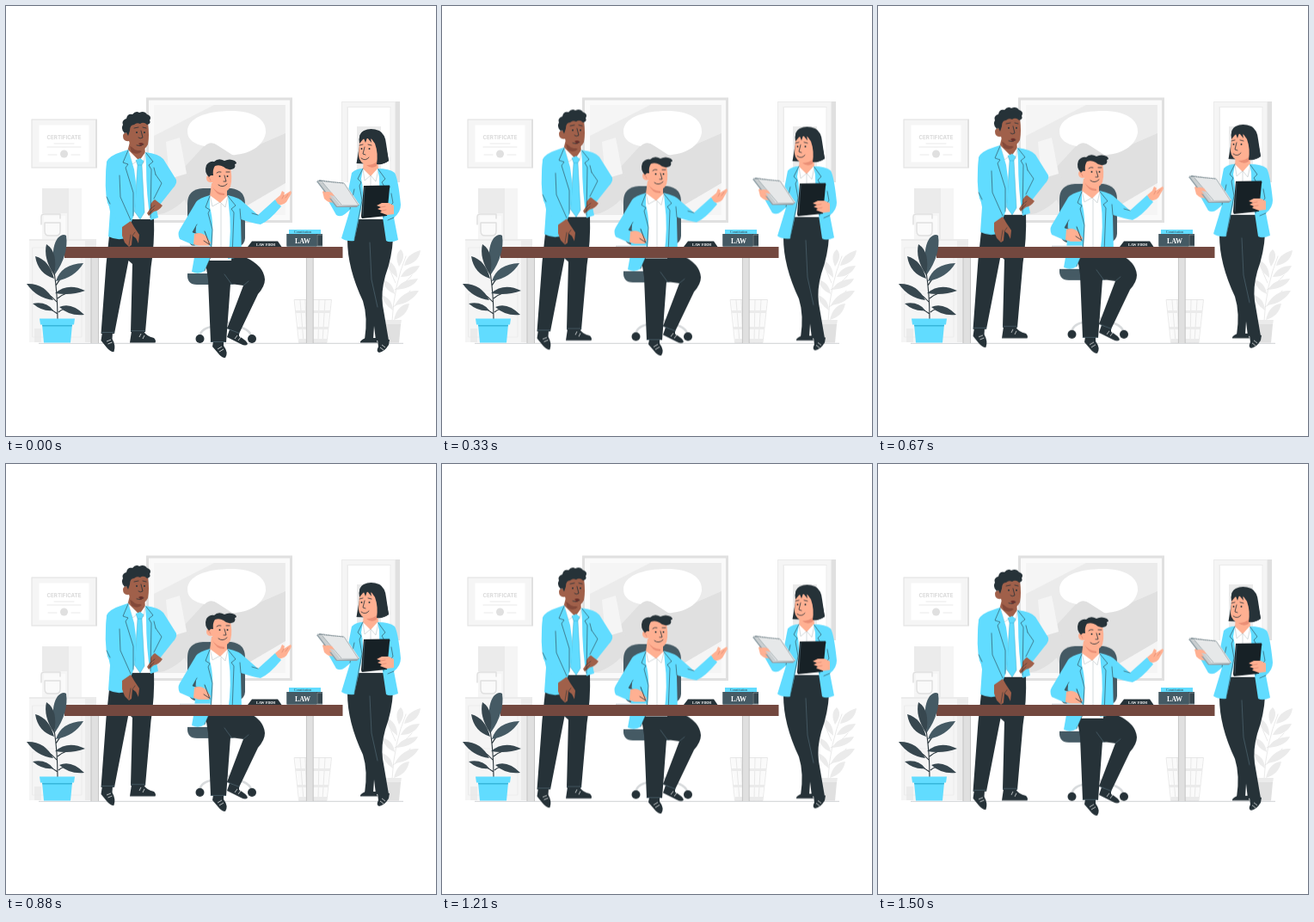
These frames come from a looping animation (500x500 px, 1.54 s). An HTML page:

```html
<!DOCTYPE html>
<html lang="en">
<head>
<meta charset="utf-8">
<title>Law office</title>
<style>
  html, body { margin: 0; width: 100%; height: 100%; overflow: hidden; background: #fff; }
  svg { display: block; width: 100vw; height: 100vh; }
  .people { animation: float 1540ms linear infinite; }
  @keyframes float { 50% { transform: translateY(-6px); } }

  .dark { fill: #263238; }
  .deep { fill: #37474f; }
  .slate { fill: #455a64; }
  .blue { fill: #61dcff; }
  .white { fill: #fff; }
  .g1 { fill: #fafafa; }
  .g2 { fill: #f5f5f5; }
  .g3 { fill: #ebebeb; }
  .g4 { fill: #e0e0e0; }
  .tan { fill: #ffb092; }
  .brown { fill: #a0604a; }
  .ink, .pale, .seam, .fold { fill: none; stroke-linecap: round; stroke-linejoin: round; }
  .ink { stroke: #263238; stroke-width: .55; }
  .face { stroke-width: .8; }
  .pale { stroke: #e0e0e0; stroke-width: .7; }
  .seam { stroke: #607d8b; stroke-width: .5; }
  .fold { stroke: #a9b4b9; stroke-width: .5; }
  .lace { fill: none; stroke: #fff; stroke-width: .7; }
  .blush { stroke: #d37b66; }
  text { text-anchor: middle; }
  .sans { font-family: Inter, "Open Sans", sans-serif; font-weight: 700; }
  .serif { font-family: "Liberation Serif", "Noto Serif", serif; font-weight: 700; }
</style>
</head>
<body>
<svg viewBox="0 0 500 500">

  <!-- wall -->
  <g id="certificate">
    <path class="g4" d="M29.500 131.500H106V188.500H29.500Z"/>
    <path class="g2" d="M30.500 132.500H104V187.500H30.500Z"/>
    <path class="white" d="M38.500 138.500H96.500V181.500H38.500Z"/>
    <text class="sans" x="67.500" y="155" font-size="6.200" fill="#d9d9d9">CERTIFICATE</text>
    <path class="pale" d="M56 160H79M48 164H87M49 173H59M76 173H86"/>
    <circle class="g4" cx="67.500" cy="172" r="4.500"/>
  </g>

  <g id="painting">
    <path class="g4" d="M163 106.500H333V252H163Z"/>
    <path class="g1" d="M166 109.500H330V249H166Z"/>
    <path class="g3" d="M172 115H325V243H172Z"/>
    <path class="g2" d="M172 115H242L172 151Z"/>
    <path class="g4" d="M230 163Q237 155 246 162L265 174L325 148V206L262 243H216L196 200Z"/>
    <path class="g2" d="M325 206V243H262Z"/>
    <path class="g4" d="M172 198Q205 190 220 203Q214 228 184 241L172 243Z"/>
    <path class="g2" d="M186 158L202 153L210 195L190 201Z"/>
    <path class="white" d="M211 146C211 130 233 122 262 122C288 122 303 132 302 147C300 163 282 173 263 173L246 162Q238 156 231 163C219 161 211 155 211 146Z"/>
  </g>

  <g id="window">
    <path class="g3" d="M390 111H453V205H390Z"/>
    <path class="g4" d="M453 111H458V205H453Z"/>
    <path class="g2" d="M391 112H452V205H391Z"/>
    <path class="g3" d="M396.500 117H447.500V205H396.500Z"/>
    <path class="white" d="M398 118H446.500V205H398Z"/>
    <path class="g3" d="M408 140H436V205H408Z"/>
  </g>

  <!-- cabinet and coffee machine -->
  <path class="g2" d="M42 212H88V272H42Z"/>
  <path class="g3" d="M42 212H71V241H42ZM71 212H73V272H71Z"/>
  <path class="g1" d="M44 244H69V266H44Z"/>
  <path class="pale" d="M41 254V245Q41 242 45 242H63V247M45 252H63V262Q63 267 58 267H50Q45 267 45 262Z" style="stroke-width:1.500"/>
  <path class="g2" d="M27 271H105V391H27Z"/>
  <path class="g3" d="M27 271H105V273H27ZM92 273H105V391H92ZM33 375H41V391H33Z"/>
  <path class="pale" d="M31 281H88V331H31ZM31 335H88V385H31Z" style="stroke:#e9e9e9"/>

  <!-- pale plant -->
  <g id="palePlant">
    <path class="pale" d="M449 366Q451 325 465 291M450 350Q460 345 470 331M452 330Q462 325 472 313M453 322Q448 311 446 305"/>
    <path class="g3" d="M457 303Q451 289 459 283Q466 290 457 303ZM463 302Q466 288 482 284Q480 299 463 302ZM455 316Q443 307 442 295Q455 300 455 316ZM459 315Q465 302 481 302Q475 315 459 315ZM454 330Q459 318 479 317Q474 328 454 330ZM452 335Q441 331 437 318Q450 321 452 335ZM452 348Q462 330 480 331Q471 346 452 348ZM450 354Q439 347 437 336Q449 340 450 354ZM451 365Q455 347 469 346Q466 361 451 365Z"/>
    <path class="g4" d="M436 365H459.500L457 391.500H439Z"/>
    <path class="g3" d="M436 365H459.500L459 370H436.500Z"/>
  </g>

  <!-- bin and desk legs -->
  <path class="g1" d="M336 341H378L372 391H342Z"/>
  <path class="pale" d="M335.500 341.500H378.500L373 391.500H341ZM342 342L346 391M364 342L363 391M371 342L368 391M348 342L350 391"/>
  <path class="g3" d="M337 354H377V357H337ZM339 373H375V376H339ZM341 387H373V391H341Z"/>
  <path d="M38 392.300H462" stroke="#b9bec0" stroke-width=".7"/>
  <path class="g4" d="M98.500 293H108V392H98.500ZM349 293H357.500V392H349Z"/>
  <path d="M99 293V392M107.500 293V392M349.400 293V392M357.200 293V392" stroke="#b4b4b4" stroke-width=".6"/>

  <g class="people">

    <!-- standing man -->
    <g id="advisor">
      <path class="dark" d="M121 258Q145 243 172 246Q173 276 168.500 304L162 379H145L147 300L142.500 296L126 381H110.500L116.500 300Z"/>
      <path class="dark" d="M112 379L124 380L123.500 387Q128 395 125.500 402Q122 403 117 397L110.500 389ZM146 378H160Q163 384 172 386Q175 389 173.500 391.500H144Z"/>
      <path class="lace" d="M117 390L122 388M118.500 393L123.500 391M155 385L157 381M159 387L161 383"/>
      <path class="seam" d="M111.500 379.500H126M145.500 377.700H162"/>
      <path class="brown" d="M144 158H161L162 174L156 183L141 170Z"/>
      <path d="M144 163L158 169Q153 174 146 170Z" fill="#83493a"/>
      <path class="white" d="M142 167L155 180L162 170L166 184L168 248H145L135 185Z"/>
      <path class="fold" d="M142 167L147 184L155 178L160 183L162 171"/>
      <path class="blue" d="M151 179L156 177L160 180L158 185L161 240L156 248L149.500 239L153 185Z"/>
      <path d="M151 179L153 185H158L160 180M153 185L149.500 239L156 248L161 240L158 185" fill="none" stroke="#38a7c8" stroke-width=".45"/>
      <!-- right sleeve and hand -->
      <path class="blue" d="M162 170Q178 172 183 178L198 202Q199 207 194 212L179 231L175 236L177 246L168 249Q163 220 163 185Z"/>
      <path class="brown" d="M173 225L182 232Q178 238 172 239L166 244L164 241L168 235Q167 229 173 225Z"/>
      <path class="ink" d="M166 242L172 236M168 236L173 232"/>
      <!-- left side of the jacket -->
      <path class="blue" d="M142 167L136 169Q120 174 117 181Q115 203 118 224L121 239L119 268Q129 273 139 270L148 245Q154 218 149 190Z"/>
      <path class="blue" d="M117 184Q114 212 118 229L134 259L146 250L133 224L132 197Z"/>
      <path class="brown" d="M135 257L145 250L149 257L155 266L154 276L151 270L147 267L146 278L143 280L138 275L135 267Z"/>
      <path class="ink" d="M143 278L145 266M147 267L150 263M132 197L133 222L145 249M117 222L121 230M142 168L136 182L142 184L139 188L148 217L148 244M163 171L171 181L166 185L169 190L168 246M174 196L181 206L172 224M174 196L172 188"/>
      <!-- head -->
      <path class="brown" d="M142 135Q153 131 165 137Q167 150 165 161Q161 169 153 168Q145 166 143 157Q136 158 136 151Q136 147 142 147Z"/>
      <path class="dark" d="M138 148Q133 143 136 138Q134 133 140 131Q141 125 147 126Q151 121 155 124Q161 121 164 126Q170 128 167 133Q169 137 164 138Q160 134 156 137Q152 135 149 138Q144 138 144 145L142 151L140 147Z"/>
      <path class="ink face" d="M149 142L154 141M159 141L163 142M157 145L159 153Q156 155 154 153M152 162Q156 164 160 161"/>
      <path d="M154 160Q157 158 160 160L157 163Z" fill="#69302b"/>
      <circle class="dark" cx="152" cy="147" r="1"/>
      <circle class="dark" cx="161" cy="147" r="1"/>
    </g>

    <!-- chair and seated man -->
    <g id="lawyer">
      <path class="slate" d="M211 230Q211 213 229 212H262Q278 214 278 230V270Q277 281 263 281H224Q211 280 211 266Z"/>
      <path d="M225 385Q226 374 244 372L251 366V324H256V366L264 372Q284 374 286 386" fill="none" stroke="#d6d9db" stroke-width="2.500"/>
      <circle class="dark" cx="225.500" cy="387" r="5"/>
      <circle class="dark" cx="286" cy="387" r="5"/>
      <path class="slate" d="M211 311H270Q274 314 272 319Q268 324 260 324H222Q210 324 211 311Z"/>
      <path class="dark" d="M231 292H278Q300 302 301 318Q301 326 293 335L271 381L257 375L276 325L261 323L256 391H238L235 318Z"/>
      <path class="seam" d="M262 323L254 312M276 325L282 320"/>
      <path class="dark" d="M241 390H253L253 395Q259 403 255 409Q251 409.500 246 403L240 396ZM260 376L271 380L271 384Q280 389 281 393Q279 396 273 393L257 385Z"/>
      <path class="lace" d="M246 399L251 396M248 402L253 399M266 387L269 383M270 389L273 385"/>
      <path class="seam" d="M238 390.500H255M258 375.500L271.500 380.500"/>
      <path class="tan" d="M239 206H257V222L250 232L237 221Z"/>
      <path class="white" d="M237 220L249 229L258 220L264 231L262 296H236L232 230Z"/>
      <path class="fold" d="M237 220L240 233L249 228L255 234L258 221M250 230V289"/>
      <!-- jacket -->
      <path class="blue" d="M258 220Q272 223 277 229L293 243L313 225L320 233Q306 250 296 254Q288 253 273 248L274 292L258 294Q263 260 259 232Z"/>
      <path class="blue" d="M237 220Q225 223 221 228L202 260Q199 265 202 271L218 278H225V266L217 263L221 256L219 292L216 309Q224 313 231 308L238 292Q243 254 237 234Z"/>
      <path class="ink" d="M237 221L232 234L237 237L235 241L240 260L238 292L231 308M258 221L267 232L262 236L265 240L263 292M273 248L272 236M222 254L217 263L224 265M218 278L222 270M293 243L286 241"/>
      <!-- hands -->
      <path class="tan" d="M313 225L319 220L321 215L324 217L323 220L331 215Q333 217 330 221L326 228Q322 232 318 231L316 230Z"/>
      <path class="ink blush" d="M323 220L321 224M328 219L325 223"/>
      <path class="tan" d="M219 265Q227 262 233 268L238 275L236 279H224L218 277Z"/>
      <path class="ink face" d="M230 273L236 277M237 278L231 262"/>
      <!-- head -->
      <path class="tan" d="M240 185H260Q264 199 261 210Q257 218 249 216Q241 214 240 205Q233 206 233 200Q233 196 239 196Z"/>
      <path d="M240 210Q244 217 254 218L254 220Q245 221 240 210Z" fill="#ea8f76"/>
      <path class="dark" d="M236 199Q230 193 233 185Q237 180 242 181Q247 176 254 180Q260 177 266 180Q270 183 266 184Q268 189 262 190Q257 191 253 187Q248 184 243 186Q240 190 241 197L238 197Z"/>
      <path class="ink face" d="M245 194Q247 192 250 193M256 193L260 193M254 197L256 204L253 204M247 208Q252 212 257 207"/>
      <path class="ink blush" d="M235 199Q237 199 238 203"/>
      <circle class="dark" cx="248.500" cy="198" r="1"/>
      <circle class="dark" cx="257.500" cy="198" r="1"/>
    </g>

    <!-- woman -->
    <g id="clerk">
      <path class="dark" d="M409 246H441L450 270Q449 292 441 314Q436 332 438 348L445 389H430L428 372L427 388H417Q421 362 415 343Q397 305 397 272Z"/>
      <path class="seam" d="M423 275L425 318L432 350"/>
      <path class="dark" d="M418 386H430L432 391.500H412Q411 389 418 386ZM432 388H446L445 394Q440 402 434 403Q430 402 433 396Z"/>
      <path class="lace" d="M435 397L439 400M437 394L441 397"/>
      <path class="dark" d="M407.500 183L412 157Q409 149 416 145Q424 141 434 145Q441 149 442 160L445 180Q440 184.500 430 184Z"/>
      <path class="tan" d="M416 176H432L433 191L424 202L415 191Z"/>
      <path class="white" d="M415 189L424 198L432 189L440 202V248H409V200Z"/>
      <path class="fold" d="M415 189L417 203L424 197L430 204L433 190M424 198V246"/>
      <path class="blue" d="M415 189Q407 189 402 194L396 225L383 222L375 227L384 243Q389 246 394 242L400 237L390 270Q396 274 405 273L413 236Q417 215 413 201Z"/>
      <path class="blue" d="M432 189Q446 189 452 194Q456 201 459 231Q459 240 451 246L456 272Q447 276 442 273L437 239Q434 215 434 199Z"/>
      <path class="ink" d="M415 189L409 201L413 205L411 209L414 226L405 272M433 190L441 201L437 205L440 210L439 246M400 236L405 213M451 246L444 249M448 218L450 229L446 233"/>
      <!-- notebook -->
      <path class="tan" d="M368 216Q372 212 377 214L384 222L381 228Q376 230 370 224Z"/>
      <path d="M361 204L366 202L394 207L411 231L408 234H384Z" fill="#90a0a7"/>
      <path d="M362 203L393 206L410 232L385 233Z" fill="#c9ced0"/>
      <path d="M366 202L394 206L411 231L388 231Z" fill="#e6e8e9"/>
      <path d="M362 203L393 206L410 232M368 205L390 231" fill="none" stroke="#87959b" stroke-width=".6"/>
      <path d="M364 203L392 206" stroke="#455a64" stroke-width="1.200" stroke-dasharray=".6 1.500"/>
      <path class="tan" d="M369 217Q374 215 379 217L382 221L376 220L379 224L373 223Z"/>
      <!-- tablet -->
      <path d="M416 209L446 208.500Q447 210 446 212L443 244L414 247Q413 246 413 244Z" fill="#172126"/>
      <path class="seam" d="M417 211L415 244"/>
      <path class="tan" d="M451 232L445 229L437 229L431 232L436 234L432 236L437 238L435 240L443 243L451 242Z"/>
      <path class="ink blush" d="M436 234L441 233M437 238L442 237"/>
      <!-- face -->
      <path class="tan" d="M411 156Q423 151 432 158L433 174Q431 185 422 185Q411 184 410 174Z"/>
      <path class="dark" d="M411 160Q409 148 417 145Q434 142 440 154L445 180Q438 185 431 184Q433 171 429 160L424 153L425 159L420 153L418 159L416 154Z"/>
      <path class="ink face" d="M411 162L415 161M421 161L425 162M417 164L415 172L418 173M413 177Q418 181 422 176"/>
      <circle class="dark" cx="413.500" cy="166" r="1"/>
      <circle class="dark" cx="422.500" cy="166" r="1"/>
      <path d="M419 185Q427 185 431 181L431 186Q425 190 419 185Z" fill="#ea8f76"/>
    </g>
  </g>

  <!-- desk -->
  <path d="M68 280H391.500V293H68Z" fill="#73483f"/>
  <path d="M202 278.500H237L238 280H202Z" fill="#d5dadd"/>
  <path class="dark" d="M286 273.500H316L320.500 280H281Z"/>
  <text class="serif white" x="302" y="278.600" font-size="4.300">LAW FIRM</text>
  <path class="deep" d="M326.500 265H368V279.500H326.500Z"/>
  <path class="slate" d="M326.500 265H361V279.500H326.500Z"/>
  <path class="fold" d="M368 266H362V279H368"/>
  <text class="serif white" x="345" y="275.500" font-size="8">LAW</text>
  <path class="blue" d="M329 260H366V265H329Z"/>
  <text class="serif dark" x="345" y="264" font-size="4" style="font-weight:400">Constitution</text>

  <!-- potted plant -->
  <g id="plant">
    <path d="M60 365Q60 335 56 309M59 344Q47 331 36 329M60 340Q69 332 84 332M60 358Q49 350 38 348M61 356Q72 347 85 355M58 325Q66 310 84 303" fill="none" stroke="#263238" stroke-width="1.100"/>
    <path class="slate" d="M57 312Q51 283 60 270Q66 264 70 267Q73 289 57 312ZM58 320Q64 300 90 299Q80 316 58 320Z"/>
    <path class="deep" d="M56 313Q43 293 47 277Q61 286 56 313ZM56 317Q37 311 34 291Q50 295 56 317ZM55 342Q36 340 24 323Q45 322 55 342ZM57 334Q72 321 92 331Q76 337 57 334ZM55 354Q43 356 31 346Q47 343 55 354ZM62 350Q76 344 91 359Q74 361 62 350Z"/>
    <path class="blue" d="M39 363.500H80L79 370.500H77L75 391.500H44L42 370.500H40Z"/>
    <path d="M42 371H77L76.500 372.500H42.500Z" fill="#37b6da"/>
  </g>
</svg>
</body>
</html>
```
